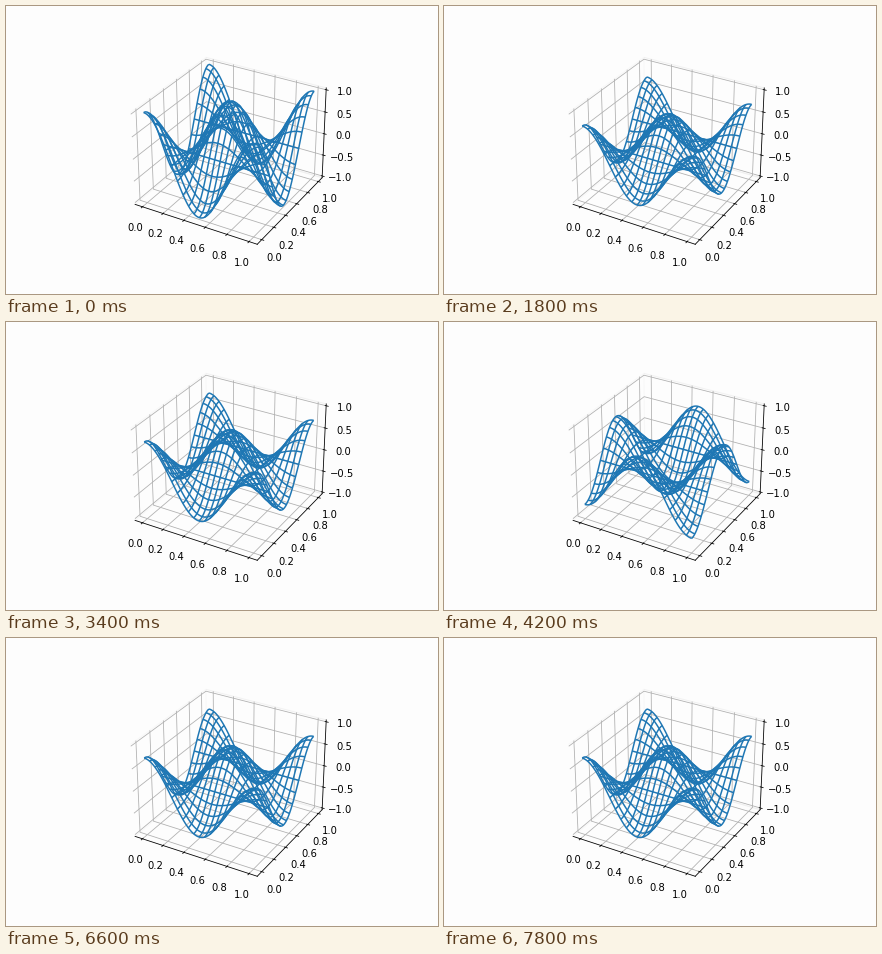
A matplotlib script that plays this animation: 432 by 288 pixels, repeating every 8000 ms.

```python
import matplotlib.pyplot as plt
import numpy as np
from matplotlib.animation import FuncAnimation

FRAMES, INTERVAL, PERIOD = 40, 200, 8
POINTS, STRIDE = 101, 5
PAPER = "#fdfdfd"

plt.rcParams["font.family"] = "DejaVu Sans"
plt.rcParams["font.size"] = 10

fig = plt.figure(figsize=(6, 4), dpi=72, facecolor=PAPER)
fig.subplots_adjust(left=0.125, right=0.9, bottom=0.125, top=0.88)
ax = fig.add_subplot(projection="3d", facecolor=PAPER)
ax.view_init(elev=30, azim=-60)


def padded(lo, hi):
    pad = (hi - lo) / 48
    return lo - pad, hi + pad


ax.set_xlim(*padded(-0.05, 1.05))
ax.set_ylim(*padded(-0.05, 1.05))
ax.set_zlim(*padded(-1, 1))
ax.set_xticks(np.linspace(0, 1, 6))
ax.set_yticks(np.linspace(0, 1, 6))
ax.set_zticks(np.linspace(-1, 1, 5))
for axis in (ax.xaxis, ax.yaxis, ax.zaxis):
    axis.pane.set_fill(False)

side = np.linspace(0, 1, POINTS)
X, Y = np.meshgrid(side, side)
mode = np.cos(2 * np.pi * X) * np.cos(2 * np.pi * Y)
wires = []


def update(i):
    while wires:
        wires.pop().remove()
    Z = mode * np.cos(2 * np.pi * i / PERIOD)
    wires.append(ax.plot_wireframe(X, Y, Z, rstride=STRIDE, cstride=STRIDE,
                                   color="C0", linewidth=1.5))
    return wires


anim = FuncAnimation(fig, update, frames=FRAMES, interval=INTERVAL,
                     init_func=lambda: update(0), repeat=True,
                     repeat_delay=0, blit=False)
plt.show()
```
